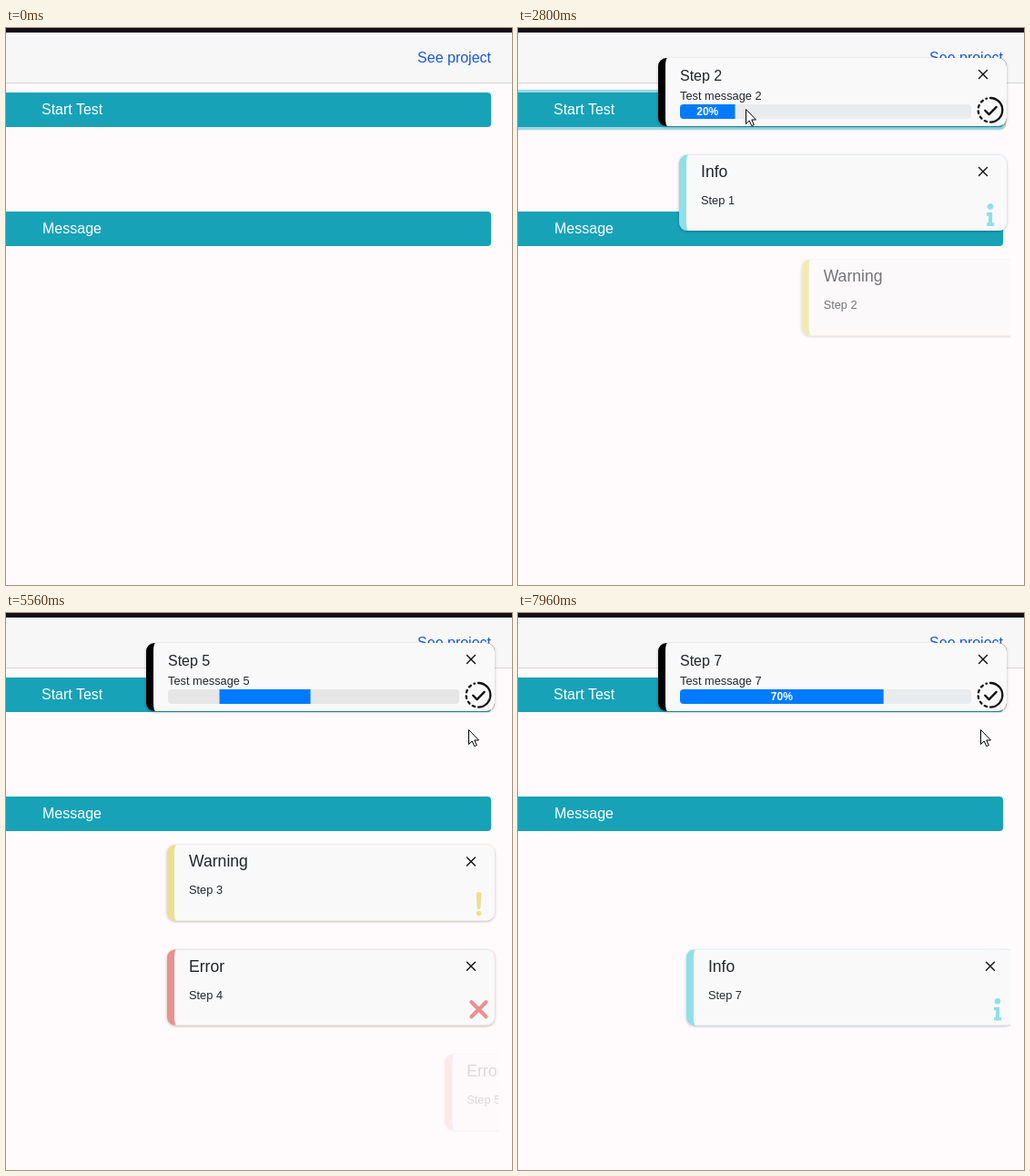
Animation of 556x613 px, one loop 7.99 s. Source, as an HTML page:

```html
<!DOCTYPE html>
<html lang="en">
<head>
<meta charset="utf-8">
<title>Step notifications</title>
<style>
  html, body { margin: 0; width: 100%; height: 100%; overflow: hidden; background: #fffafb; }
  svg { display: block; width: 556px; height: 613px; }
  text { font-family: "Liberation Sans", Arial, sans-serif; fill: #212529; }
  .btn { font-size: 16px; fill: #fff; }
  .title { font-size: 17.6px; }
  .step { font-size: 16px; }
  .body { font-size: 12.8px; }
  .percent { font-size: 12px; font-weight: bold; fill: #fff; text-anchor: middle; }
  .line { fill: none; stroke: #111; stroke-linecap: round; stroke-linejoin: round; }
</style>
</head>
<body>
<svg id="stage" viewBox="0 0 556 613" xmlns="http://www.w3.org/2000/svg"></svg>
<script>
const LOOP = 7990;
const PITCH = 115.3;
const ENTER = 500, LEAVE = 380;
const INFO = "#8fdfe8", WARNING = "#ebe08f", ERROR = "#eb8f8f";

// enter, leave and removal times; a faded toast keeps its slot until it is removed
const toasts = [
  { kind: "Info", color: INFO, step: 1, enter: 1528, leave: 4120, gone: 4470 },
  { kind: "Warning", color: WARNING, step: 2, enter: 2488, leave: 5000, gone: 6200 },
  { kind: "Warning", color: WARNING, step: 3, enter: 3487, leave: 5650, gone: 7080 },
  { kind: "Error", color: ERROR, step: 4, enter: 4486, leave: 6620, gone: LOOP },
  { kind: "Error", color: ERROR, step: 5, enter: 5485, leave: 7500, gone: LOOP },
  { kind: "Info", color: INFO, step: 7, enter: 7472, leave: LOOP, gone: LOOP }
];
const labelTimes = [1480, 2230, 3440, 4440, 5440, 6440, 7440];
const barTimes = [1480, 2436, 3440, 4440, 5440, 6440, 7440];

const clamp = v => Math.max(0, Math.min(1, v));
const ramp = (t, start, length) => clamp((t - start) / length);
const mix = (a, b, p) => a + (b - a) * p;
const smooth = p => p * p * (3 - 2 * p);

function bezier(a, b, u) {
  return 3 * a * u * (1 - u) ** 2 + 3 * b * u * u * (1 - u) + u ** 3;
}

function ease(p) {
  let low = 0, high = 1;
  for (let i = 0; i < 24; i++) {
    const mid = (low + high) / 2;
    if (bezier(.25, .25, mid) < p) low = mid; else high = mid;
  }
  return bezier(.1, 1, low);
}

function panel(w, h, color) {
  const r = 9;
  return `<rect width="${w}" height="${h}" rx="${r}" fill="${color}" filter="url(#shadow)"/>
    <path fill="#f9f9fa" d="M10 0H${w - r}A${r} ${r} 0 0 1 ${w} ${r}V${h - r}
      A${r} ${r} 0 0 1 ${w - r} ${h}H10A2 ${r} 0 0 1 8 ${h - r}V${r}A2 ${r} 0 0 1 10 0Z"/>`;
}

function closeMark(x, y) {
  return `<path class="line" stroke-width="1.4" d="M${x - 4.5} ${y - 4.5}l9 9m0 -9l-9 9"/>`;
}

const icons = {
  Info: `<circle cx="342" cy="57" r="3.3"/>
    <path d="M338 63.5h6.2v11.2h2v3.6h-8v-3.6h1.8v-7.6h-2z"/>`,
  Warning: `<path d="M339.6 53.5q0-1.5 2.9-1.5t2.9 1.5l-1 16q-.2 1.5-1.9 1.5t-1.9-1.5z"/>
    <circle cx="342.5" cy="75.6" r="2.8"/>`,
  Error: `<path d="M334.5 58l16 16m0-16l-16 16" fill="none" stroke="${ERROR}"
    stroke-width="4.2" stroke-linecap="round"/>`
};

function toastMarkup(toast, i) {
  return `<g id="toast${i}">${panel(360, 83.5, toast.color)}
    <text class="title" x="24" y="24.5">${toast.kind}</text>
    <text class="body" x="24" y="54.5">Step ${toast.step}</text>
    ${closeMark(334, 18.5)}<g fill="${toast.color}">${icons[toast.kind]}</g>
    ${i ? "" : `<rect id="focus" class="line" x="324" y="8.5" width="20.5" height="21" rx="3" stroke-width="2"/>`}
  </g>`;
}

function button(id, y, label, x) {
  return `<rect id="${id}" x="-20" y="${y}" width="553" height="38" rx="4" fill="#17a2b8"/>
    <text class="btn" x="${x}" y="${y + 24}">${label}</text>`;
}

const stage = document.getElementById("stage");
stage.innerHTML = `
  <defs>
    <clipPath id="area"><rect width="541" height="613"/></clipPath>
    <clipPath id="track"><rect x="24" y="51" width="320" height="16" rx="4"/></clipPath>
    <filter id="shadow" x="-10%" y="-20%" width="120%" height="150%">
      <feDropShadow dx="0" dy="1" stdDeviation="1.6" flood-opacity=".28"/>
    </filter>
  </defs>
  <rect width="556" height="613" fill="#fffafb"/>
  <rect width="556" height="60" fill="#f7f7f7"/>
  <rect width="556" height="5" fill="#140d19"/>
  <rect y="60" width="556" height="1" fill="#d5d5d5"/>
  <text class="btn" x="533" y="38" text-anchor="end" style="fill:#1a5ad0">See project</text>
  <rect id="ring" x="-23" y="67.8" width="559.2" height="44.4" rx="7" fill="#9dd7e1"/>
  ${button("start", 71, "Start Test", 39)}
  ${button("message", 202, "Message", 40)}
  <g clip-path="url(#area)">
    ${toasts.map(toastMarkup).join("")}
    <g id="progress">${panel(383, 75, "#000")}
      <text id="stepText" class="step" x="24" y="25"></text>
      <text id="messageText" class="body" x="24" y="46"></text>
      <g clip-path="url(#track)">
        <rect id="trackFill" x="24" y="51" width="320" height="16"/>
        <rect id="bar" y="51" height="16" fill="#007bff"/>
      </g>
      <text id="percent" class="percent" y="63"></text>
      ${closeMark(357, 18)}
      <path class="line" stroke-width="2.3" d="M365 44a13.3 13.3 0 0 1 0 26.6M359.2 57.7l4.4 4.4l8-8.2"/>
      <path class="line" stroke-width="2.3" stroke-dasharray="2.4 4.2" d="M361 70a13.3 13.3 0 0 1 0-25.4"/>
    </g>
  </g>
  <g id="cursor" stroke="#000" stroke-width="1" fill="#fff" stroke-linejoin="round">
    <path id="arrow" d="M.5 .5V16.5L4.2 13L6.8 18.7L9.3 17.6L6.8 12H11.5Z"/>
    <path id="hand" d="M3.5 1.5q1.8-1.2 2.7 .5v7q2.2-1 2.8 .5q2-.6 2.6 .8q2.2-.3 2.2 1.8v4
      q0 2.6-1.8 4v2.6h-7.4v-2.3q-3-3.2-4.8-6.6q-.4-2.2 1.6-1.8l2 2.2z"/>
  </g>`;

const el = id => document.getElementById(id);
const set = (id, attrs) => {
  for (const name in attrs) el(id).setAttribute(name, attrs[name]);
};
const show = (id, on) => set(id, { display: on ? "inline" : "none" });
const place = (id, x, y, opacity) =>
  set(id, { transform: `translate(${x.toFixed(2)} ${y.toFixed(2)})`, opacity });

function drawButton(t) {
  const dark = ramp(t, 480, 150) - ramp(t, 1480, 150);
  const from = [23, 162, 184], to = [19, 132, 150];
  set("start", { fill: `rgb(${from.map((c, i) => Math.round(mix(c, to[i], dark)))})` });
  set("ring", { opacity: ramp(t, 830, 150) - ramp(t, 4060, 150) });
}

function drawToasts(t) {
  let slot = 0;
  toasts.forEach((toast, i) => {
    const live = t >= toast.enter && t < toast.gone;
    show("toast" + i, live);
    if (!live) return;
    const shown = ramp(t, toast.enter, ENTER) - ramp(t, toast.leave, LEAVE);
    place("toast" + i, 177 + 360 * (1 - shown), 139.6 + PITCH * slot++, shown);
  });
  show("focus", t >= 4060);
}

function drawProgress(t) {
  const shown = ramp(t, 1609, ENTER);
  show("progress", shown > 0);
  place("progress", 154 + 383 * (1 - shown), 33, shown);

  const label = Math.max(1, labelTimes.filter(s => t >= s).length);
  el("stepText").textContent = "Step " + label;
  el("messageText").textContent = "Test message " + label;

  const step = Math.max(1, barTimes.filter(s => t >= s).length);
  const endless = step === 5;
  set("trackFill", { fill: endless ? "#e6e6e6" : "#e9ecef" });
  show("percent", !endless);
  if (endless) {
    const x = Math.max(0, t - 5458) * .549 % 320;
    set("bar", { x: 24 + x, width: 100 });
    return;
  }
  const jump = step === 1 || step === 6;
  const grown = jump ? 1 : ease(ramp(t, barTimes[step - 1], 600));
  const width = 32 * (step - 1 + grown);
  set("bar", { x: 24, width });
  set("percent", { x: 24 + width / 2 });
  el("percent").textContent = step * 10 + "%";
}

function drawCursor(t) {
  const moves = [[250, 390, 250, 89], [2990, 980, 508, 153], [4260, 300, 508, 128]];
  let x = 540, y = 29;
  for (const [start, length, toX, toY] of moves) {
    const p = smooth(ramp(t, start, length));
    x = mix(x, toX, p);
    y = mix(y, toY, p);
  }
  const onClose = t > 3880 && t < 4440;
  show("cursor", t >= 100);
  show("arrow", !onClose);
  show("hand", onClose);
  place("cursor", x, y, 1);
}

function draw(t) {
  drawButton(t);
  drawToasts(t);
  drawProgress(t);
  drawCursor(t);
}

const begin = performance.now();
function frame() {
  draw((performance.now() - begin) % LOOP);
  requestAnimationFrame(frame);
}
frame();
</script>
</body>
</html>
```
